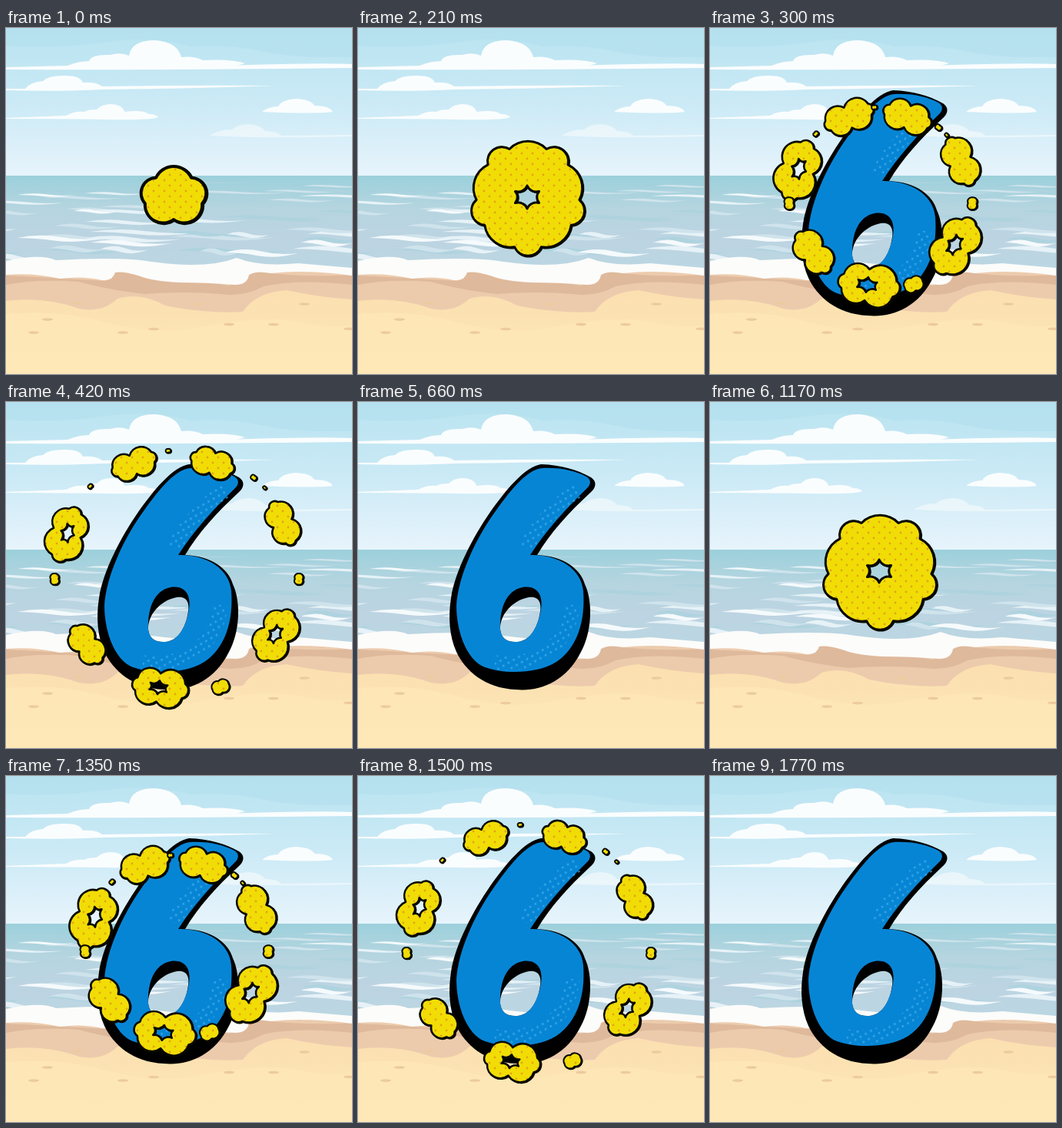
These frames come from a looping animation (450 by 450 pixels, 1.8 s). An HTML page:

```html
<!DOCTYPE html>
<html>
<head>
<meta charset="utf-8">
<style>
html, body { margin: 0; width: 100%; height: 100%; overflow: hidden }
svg { display: block; width: 100vw; height: 100vh }
</style>
</head>
<body>
<svg viewBox="0 0 450 450">
  <defs>
    <linearGradient id="sky" x2="0" y2="1">
      <stop stop-color="#b9e3f0"/><stop offset=".5" stop-color="#cbeaf6"/><stop offset="1" stop-color="#e8f4fc"/>
    </linearGradient>
    <linearGradient id="sea" x2="0" y2="1">
      <stop stop-color="#9bd0db"/><stop offset=".3" stop-color="#b5d5e0"/>
      <stop offset=".6" stop-color="#bdd4e2"/><stop offset="1" stop-color="#b9d8e2"/>
    </linearGradient>
    <linearGradient id="sand" x2="0" y2="1">
      <stop stop-color="#fbdfb0"/><stop offset="1" stop-color="#fee9b8"/>
    </linearGradient>
    <pattern id="spots" width="14" height="14" patternUnits="userSpaceOnUse">
      <rect width="14" height="14" fill="#f1dd05"/>
      <g fill="#e3a515"><circle cx="3" cy="9" r="1.4"/><circle cx="10" cy="2" r="1.4"/></g>
    </pattern>
    <pattern id="halftone" width="11" height="11" patternUnits="userSpaceOnUse" patternTransform="rotate(15)">
      <g fill="#35a6e6"><circle cx="2" cy="2" r="1.4"/><circle cx="7.5" cy="7.5" r="1.4"/></g>
    </pattern>
  </defs>

  <rect width="450" height="195" fill="url(#sky)"/>
  <path d="M0 0H450V38Q380 40 335 31Q290 20 240 24Q190 10 130 18Q60 28 0 23Z" fill="#b3dfee" opacity=".6"/>
  <g fill="#fafdfe">
    <path d="M80 49Q94 43 108 43Q111 34 135 35Q150 31 160 36Q163 16 194 16Q223 18 228 38Q245 36 256 42Q294 40 311 46Q300 50 290 49Q400 45 450 47V52Q200 55 0 54V51Z"/>
    <path d="M0 79L25 79Q32 70 48 69Q55 62 74 62Q96 61 100 71Q118 70 125 76Q240 74 350 75Q240 79 125 80Q70 83 0 81Z"/>
    <path d="M0 117Q50 115 78 114Q89 108 102 109Q106 106 118 106Q125 99 136 99Q151 99 154 109Q178 106 186 112Q195 112 198 116Q190 120 130 119Q60 118 0 118Z"/>
    <path d="M333 109Q342 102 354 102Q359 93 377 92Q397 93 401 101Q421 101 425 109Q400 112 333 109Z"/>
    <path d="M265 140Q280 131 294 132Q301 125 318 125Q332 127 337 134Q353 134 358 140L450 139V141Q340 144 265 140Z" opacity=".55"/>
  </g>

  <rect y="192" width="450" height="140" fill="url(#sea)"/>
  <g id="waves"></g>
  <path d="M0 312H450V370H0Z" fill="#eccbad"/>
  <path d="M0 322Q60 325 130 329L140 316Q200 320 290 335L325 317Q390 325 450 321V334Q380 326 335 336Q310 350 280 346Q230 342 180 346Q130 340 95 330Q40 326 0 334Z" fill="#dfb99b"/>
  <path d="M0 303Q45 293 65 302Q150 297 190 304Q260 314 300 299Q330 311 380 306L450 312V322Q390 314 345 319Q325 315 316 321Q314 334 298 334Q260 331 225 331Q190 329 175 323Q152 316 142 318Q139 329 125 328Q100 322 70 326Q35 318 0 321Z" fill="#fcfcfa"/>
  <path d="M0 355Q50 349 95 365Q125 371 145 352Q175 343 207 361Q260 372 308 369Q326 343 365 341Q405 350 450 353V450H0Z" fill="url(#sand)"/>
  <path d="M0 372Q70 366 130 383Q200 402 260 388Q340 373 390 384Q425 391 450 387V450H0Z" fill="#ffe9b8" opacity=".7"/>
  <g id="pebbles" fill="#eccb9f"></g>

  <g id="six">
    <path fill-rule="evenodd" d="M238 81C265 82 285 88 303 98C312 104 309 113 301 119C275 143 250 170 233 199C268 200 290 218 295 237C306 260 304 300 290 325C270 365 235 377 205 374C165 372 140 350 128 325C119 305 117 280 121 255C126 220 150 175 172 143C192 115 217 84 238 81ZM185 296C184 278 200 258 222 254C236 252 240 262 236 278C232 297 222 311 207 312C194 313 186 307 185 296Z"/>
    <path fill="#0785d5" fill-rule="evenodd" d="M240 86C265 85 283 90 297 97C304 101 303 108 297 113C270 139 243 169 224 199C262 198 291 218 293 246C296 285 285 320 258 338C232 354 190 354 165 345C142 336 128 300 128 265C130 228 152 180 176 146C195 119 219 87 240 86ZM185 296C184 268 193 245 214 241C232 238 243 250 237 275C232 297 222 311 207 312C194 313 186 307 185 296Z"/>
    <g fill="none" stroke="url(#halftone)" stroke-width="19">
      <path d="M218 190C234 160 258 133 287 114"/>
      <path d="M178 339C235 345 274 315 279 264"/>
    </g>
  </g>
  <g id="small"></g>
  <g id="donut"></g>
  <g id="near"></g>
  <g id="ring"></g>
  <g id="far"></g>
</svg>
<script>
const $ = id => document.getElementById(id);
const rad = deg => deg * Math.PI / 180;
const range = (n, f) => Array.from({length: n}, (_, i) => f(i));
const polar = (cx, cy, r, deg) => [cx + r * Math.cos(rad(deg)), cy + r * Math.sin(rad(deg))];

// Closed outline of arcs through the points; sweep 1 bulges out, 0 in.
function scallop(points, sweep = 1, roundness = () => .55) {
  return points.map(([x, y], i) => {
    const [u, v] = points[(i + 1) % points.length];
    const r = Math.hypot(u - x, v - y) * roundness(i);
    return `${i ? '' : `M${x} ${y}`}A${r} ${r} 0 0 ${sweep} ${u} ${v}`;
  }).join('') + 'Z';
}

// Points around a tilted ellipse, optionally uneven.
function around([x, y], rx, ry, n, {tilt = 0, phase = -90, wobble = 0} = {}) {
  const c = Math.cos(rad(tilt)), s = Math.sin(rad(tilt));
  return range(n, i => {
    const a = rad(phase + i * 360 / n), k = 1 + wobble * Math.sin(5 * i + tilt);
    const p = k * rx * Math.cos(a), q = k * ry * Math.sin(a);
    return [x + p * c - q * s, y + p * s + q * c];
  });
}

const star = (at, rx, ry, tilt) => scallop(around(at, rx, ry, 6, {tilt}), 0, () => .75);

const puff = (d, line = 3.5) => `<g stroke="#080800" stroke-linejoin="round" fill-rule="evenodd">
  <path d="${d}" fill="none" stroke-width="${line}" transform="translate(1 .7)"/>
  <path d="${d}" fill="url(#spots)" stroke-width="${line}"/></g>`;

// Puffs lie along a ring, each turned with it; some are hollow, crumbs fall between.
const puffs = [-112, -72, -25, 32, 99, 141, 200], hollow = [32, 99, 200];
const crumbs = [[-135, 4], [-94, 4], [-51, 5], [-44, 3], [3, 9], [69, 14], [177, 9]];

function burst(spread, size) {
  const big = puffs.map(deg => {
    const at = polar(222, 222, 151 * spread, deg), tilt = deg + 90;
    const open = hollow.includes(deg);
    const [rx, ry] = open ? [36, 18] : [30, 13];
    const d = scallop(around(at, rx * size, ry * size, 6, {tilt, wobble: .08}));
    return puff(d + (open ? star(at, 13 * size, 9 * size, tilt) : ''), 2.6);
  });
  const little = crumbs.map(([deg, r]) => {
    const at = polar(222, 222, 159 * spread, deg);
    return puff(scallop(around(at, r * size * .8, r * size * .55, 4, {tilt: deg + 90})), 2);
  });
  return [...big, ...little].join('');
}

$('small').innerHTML = puff(scallop(around([218, 219], 39, 30, 5, {phase: -54})), 4);
// Five bumps on a round body
const rim = range(10, i => polar(221, 220, 67, 90 + 72 * (i >> 1) + (i % 2 ? 15 : -15)));
$('donut').innerHTML = puff(scallop(rim, 1, i => i % 2 ? .7 : .54) + star([220, 220], 18, 15, 0), 3);
$('near').innerHTML = burst(.75, 1.1);
$('ring').innerHTML = burst(1, 1);
$('far').innerHTML = burst(1.1, .5);

// Water streaks grow thicker toward the shore.
function streak(x, y, w, color) {
  const h = 2 + (y - 192) / 20;
  return `<path d="M${x} ${y}q${w * .25} ${-h} ${w * .5} ${-h * .2}t${w * .5} ${h * .3}q${-w * .3} ${h * 1.1} ${-w * .55} ${h * .5}t${-w * .45} ${-h * .6}z" fill="${color}"/>`;
}
let seed = 7;
const rnd = () => (seed = seed * 16807 % 2147483647) / 2147483647;
const ripples = range(44, i =>
  streak(rnd() * 490 - 60, 200 + rnd() * 98, 50 + rnd() * 100, ['#aed3df', '#cfe3ec', '#e6f2f7'][i % 3]));
const crests = [[15, 217, 75], [88, 238, 58], [15, 273, 110], [110, 279, 105], [384, 279, 66], [285, 292, 95]]
  .map(s => streak(...s, '#f5fafc'));
$('waves').innerHTML = [...ripples, ...crests].join('');

$('pebbles').innerHTML = range(10, i =>
  `<ellipse cx="${(i * 98 + 54) % 450}" cy="${379 + 21 * Math.sin(i * 2.2)}" rx="7" ry="1.8"/>`).join('');

// Poses and their end times within one burst of 1000 ms
const poses = [['small', 120], ['donut', 290], ['near', 380], ['ring', 530], ['far', 620], ['', 1000]];

function draw(now) {
  const t = now % 1800 % 1000;
  const pose = poses.find(p => t < p[1])[0];
  for (const [id] of poses) if (id) $(id).style.display = id === pose ? '' : 'none';
  $('six').style.display = t < 290 ? 'none' : '';
}
const start = performance.now();
function tick() {
  draw(performance.now() - start);
  requestAnimationFrame(tick);
}
tick();
</script>
</body>
</html>
```
